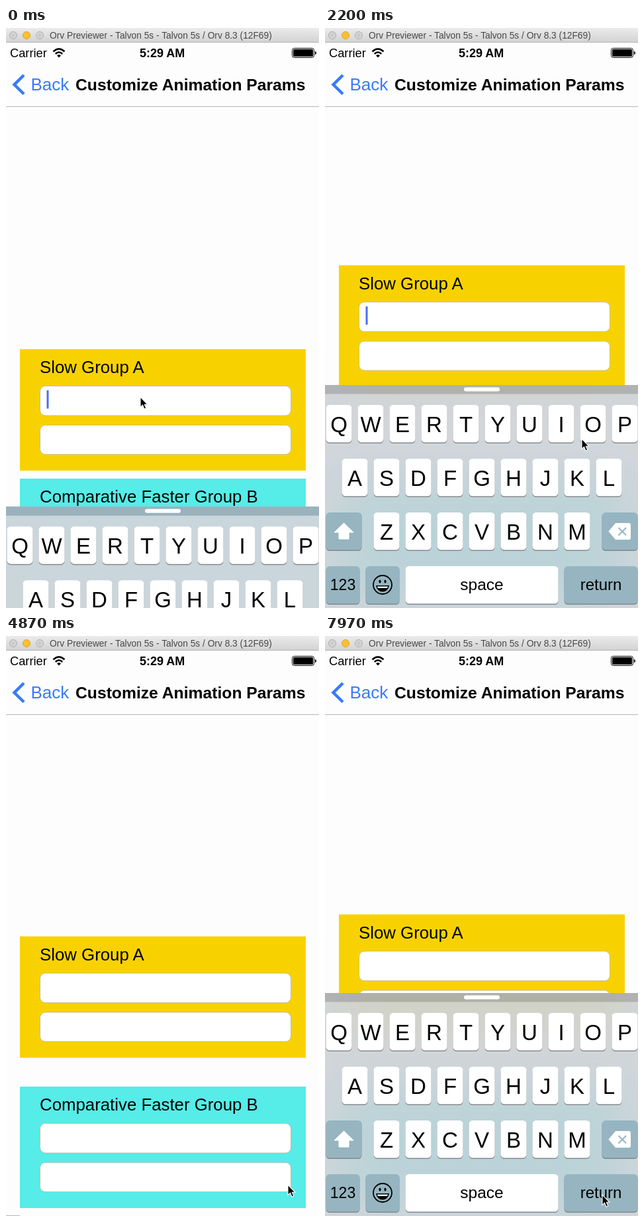
An HTML page for the animation above (8 s loop, 473 px wide and 874 px high).

```html
<!DOCTYPE html>
<html lang="en">
<head>
<meta charset="utf-8">
<title>Keyboard animation</title>
<style>
html, body { margin: 0; width: 100%; height: 100%; overflow: hidden; background: #fdfdfd; }
svg { display: block; width: 473px; height: 874px; font-family: "Liberation Sans", Arial, sans-serif; }
.blue { fill: #397bfa; }
.field { fill: #fff; stroke: #b9b79c; stroke-width: .8; }
.label { font-size: 25.8px; }
.key { fill: #fff; }
.dark { fill: #96b5c1; }
.shade { fill: #85898c; }
</style>
</head>
<body>
<svg viewBox="0 0 473 874">
  <defs>
    <linearGradient id="chrome" x2="0" y2="1"><stop stop-color="#ebebeb"/><stop offset="1" stop-color="#d2d2d2"/></linearGradient>
    <filter id="blur" filterUnits="userSpaceOnUse" x="-200" y="200" width="873" height="1000" color-interpolation-filters="sRGB"><feGaussianBlur stdDeviation="36"/></filter>
    <clipPath id="keyboardClip"><rect id="clipRect" width="473" height="336"/></clipPath>
  </defs>
  <rect width="473" height="874" fill="#fdfdfd"/>

  <g id="groupA"></g>
  <g id="groupB" transform="translate(0 679)"></g>
  <path id="hairline" d="M0 873.5H21" stroke="#b4b4b4"/>

  <g clip-path="url(#keyboardClip)">
    <g filter="url(#blur)">
      <rect x="-200" y="200" width="873" height="1000" fill="#fff"/>
      <rect id="glowA" x="21" width="432" height="183" fill="#f8d200" opacity=".6"/>
      <rect x="21" y="679" width="432" height="183" fill="#56ece8"/>
    </g>
    <rect y="500" width="473" height="374" fill="rgb(203,208,214)" opacity=".86"/>
  </g>
  <g id="keyboard">
    <rect id="slideTint" width="473" height="336" fill="#cbd6dc"/>
    <rect width="473" height="13.5" opacity=".165"/>
    <rect id="barTint" width="473" height="13.5" fill="#98b3be"/>
    <rect x="210" y="3.5" width="54" height="6" rx="3" fill="#fff"/>
    <g id="keys"></g>
    <path d="M28.5 208L43 222H36V232H21V222H14Z" fill="#fff" stroke="#fff" stroke-linejoin="round"/>
    <path d="M439 208H459Q462 208 462 211V230Q462 233 459 233H439L428.5 220.5Z" fill="#fff"/>
    <path d="M443.5 215L455 226.5M455 215L443.5 226.5" stroke="#96b5c1" stroke-width="2"/>
    <g transform="translate(87 301)">
      <circle r="14" fill="none" stroke="#000" stroke-width="1.8"/>
      <ellipse cx="-4" cy="-5" rx="1.6" ry="2.6"/><ellipse cx="4" cy="-5" rx="1.6" ry="2.6"/>
      <path d="M-10 1H10Q8 10.500 0 10.500T-10 1Z"/>
      <path d="M-8 2.500H8L7 5H-7Z" fill="#fff"/>
    </g>
  </g>

  <rect width="473" height="22" fill="url(#chrome)"/>
  <path d="M0 21.5H473" stroke="#b3b3b3"/>
  <g fill="#d5d5d5" stroke="#adadad">
    <circle cx="11" cy="11" r="5.5"/>
    <circle cx="31" cy="11" r="5.5" fill="#fdc02f" stroke="#dca22c"/>
    <circle cx="51" cy="11" r="5.5"/>
  </g>
  <path d="M8.5 8.5l5 5m0-5l-5 5M48 11h6m-3-3v6" stroke="#bcbcbc" fill="none"/>
  <text x="66" y="16" font-size="13.75" fill="#484848">Orv Previewer - Talvon 5s - Talvon 5s / Orv 8.3 (12F69)</text>

  <text x="6" y="44" font-size="18.3">Carrier</text>
  <g fill="none" stroke="#000" stroke-width="2.6">
    <path d="M71.5 35.5Q80 27.5 88.5 35.5M74.800 39Q80 34 85.200 39"/>
    <path d="M77 41.5Q80 38.5 83 41.5L80 44.5Z" fill="#000" stroke="none"/>
  </g>
  <text x="202" y="44" font-size="18" font-weight="bold">5:29 AM</text>
  <rect x="432.5" y="30.5" width="33" height="14" rx="3" fill="none" stroke="#000"/>
  <rect x="434" y="32" width="30" height="11" rx="1.5"/>
  <path d="M467 35Q469 35 469 37.5T467 40Z"/>
  <path d="M27 71L12.5 85.3L27 99.5" fill="none" stroke="#397bfa" stroke-width="4.5"/>
  <text x="37.5" y="94" font-size="26" class="blue">Back</text>
  <text x="105" y="94" font-size="24.7" font-weight="bold">Customize Animation Params</text>
  <path d="M0 118.5H473" stroke="#b5b5b5"/>

  <path id="cursor" d="M0 0V15.500L3.500 12.200L6 18L8.700 16.900L6.300 11.300H11Z" stroke="#fff" stroke-width="1.1"/>
</svg>
<script>
const $ = id => document.getElementById(id);
const clamp = v => Math.min(1, Math.max(0, v));
const LOOP = 8000, LOW = 484, TRAVEL = 127.5, KEYS_UP = 538, KEYS_HEIGHT = 336;

function buildGroup(id, title, color) {
  $(id).innerHTML = `<rect x="21" width="432" height="183" fill="${color}"/>
    <text x="51" y="36" class="label">${title}</text>
    <rect class="field" x="51.5" y="55.5" width="379" height="44.5" rx="8"/>
    <rect class="field" x="51.5" y="114.5" width="379" height="44" rx="8"/>`;
}
buildGroup('groupA', 'Slow Group A', '#f8d200');
buildGroup('groupB', 'Comparative Faster Group B', '#56ece8');
$('groupA').insertAdjacentHTML('beforeend', '<rect id="caret" x="61.5" width="3" height="27.5" fill="#4d6df3"/>');

function key(x, y, width, label = '', size = 33, style = 'key') {
  const box = (cls, dy) => `<rect class="${cls}" x="${x}" y="${y + dy}" width="${width}" height="56.5" rx="5.5"/>`;
  const baseline = y + (size > 30 ? 41 : 36);
  return box('shade', 1.5) + box(style, 0) +
    `<text x="${x + width / 2}" y="${baseline}" font-size="${size}" text-anchor="middle">${label}</text>`;
}
const letterRow = (letters, x, y) => [...letters].map((c, i) => key(x + 48 * i, y, 39, c)).join('');
$('keys').innerHTML = letterRow('QWERTYUIOP', 1.5, 30) + letterRow('ASDFGHJKL', 25.5, 111) + letterRow('ZXCVBNM', 73.5, 192) +
  key(1.5, 192, 54, '', 24, 'dark') + key(418.5, 192, 54, '', 24, 'dark') +
  key(1.5, 273, 51, '123', 23, 'dark') + key(61.5, 273, 51, '', 24, 'dark') +
  key(121.5, 273, 231, 'space', 24.5) + key(361.5, 273, 111, 'return', 24, 'dark');

// Cubic-bezier(.42, 0, .58, 1), solved by bisection.
function easeInOut(x) {
  x = clamp(x);
  let lo = 0, hi = 1;
  for (let i = 0; i < 24; i++) {
    const u = (lo + hi) / 2, v = 1 - u;
    if (1.26 * v * v * u + 1.74 * v * u * u + u ** 3 < x) lo = u; else hi = u;
  }
  return 3 * lo * lo - 2 * lo ** 3;
}

// Critically damped spring from 0 to 1.
function spring(ms) {
  const k = Math.max(0, ms) * 0.0169;
  return 1 - (1 + k) * Math.exp(-k);
}

// The keyboard moves at start; the yellow group follows about half a second later.
const moves = [
  { start: -90, follow: 395, up: true },
  { start: 3101, follow: 3604, up: false },
  { start: 6510, follow: 7000, up: true }
];

const cursorPath = [
  [0, 203, 556], [1350, 203, 556], [1630, 340, 603], [1850, 388, 619], [2280, 388, 619], [2490, 401, 649],
  [2900, 425, 827], [3320, 425, 827], [4000, 426, 827], [5350, 426, 827], [5800, 275, 710], [6060, 158, 640],
  [6330, 158, 621], [6900, 158, 621], [7350, 300, 760], [7750, 419, 842], [8000, 419, 842]
];
function cursorAt(t) {
  const i = cursorPath.findIndex(p => p[0] > t), [t0, x0, y0] = cursorPath[i - 1], [t1, x1, y1] = cursorPath[i];
  const u = (t - t0) / (t1 - t0);
  return [x0 + (x1 - x0) * u, y0 + (y1 - y0) * u];
}

function render(t) {
  const { start, follow, up } = moves.findLast(m => t >= m.start);
  const slid = spring(t - start), shown = up ? slid : 1 - slid;
  const raised = easeInOut((t - follow) / 1930);
  const groupY = LOW - TRAVEL * (up ? raised : 1 - raised);
  const keyboardY = KEYS_UP + KEYS_HEIGHT * (1 - shown);
  const sliding = clamp((keyboardY - KEYS_UP) / 40) * 0.9;

  $('groupA').setAttribute('transform', `translate(0 ${groupY})`);
  $('glowA').setAttribute('y', groupY);
  $('clipRect').setAttribute('y', keyboardY);
  $('keyboard').setAttribute('transform', `translate(0 ${keyboardY})`);
  $('slideTint').setAttribute('opacity', sliding);
  $('barTint').setAttribute('opacity', sliding);

  const blink = (t - Math.max(0, start)) % 1000;
  $('caret').setAttribute('opacity', up ? clamp((680 - blink) / 120) + clamp((blink - 930) / 70) : 0);
  $('caret').setAttribute('y', t < 6000 ? 62 : 121);
  $('hairline').setAttribute('opacity', t > 4130 && t < 6300 ? 1 : 0);
  $('cursor').setAttribute('transform', `translate(${cursorAt(t).join(' ')})`);
}

const began = performance.now();
function tick() {
  render((performance.now() - began) % LOOP);
  requestAnimationFrame(tick);
}
tick();
</script>
</body>
</html>
```
